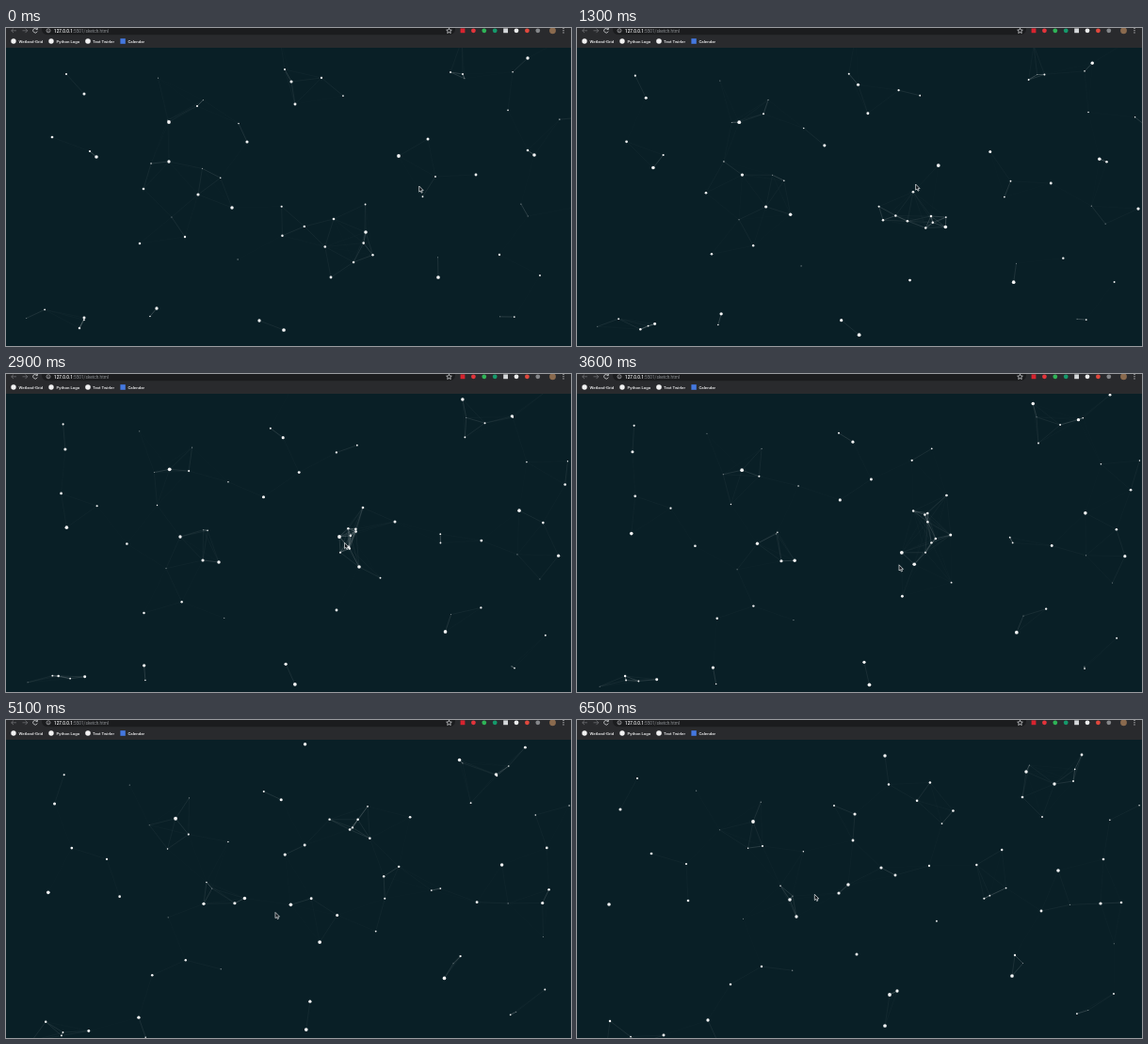
Recreate the animation shown at these times as an HTML page with a canvas. Size 600 by 338 pixels, loop 6600 ms.

```html
<!DOCTYPE html>
<html lang="en">
<head>
<meta charset="utf-8">
<title>Sketch</title>
<style>
  html, body { margin: 0; width: 100%; height: 100%; overflow: hidden; background: #091f26; }
  canvas, svg { position: absolute; left: 0; top: 0; width: 600px; height: 338px; }
  text { font-family: Roboto, Inter, sans-serif; }
  .mark { font-size: 4.4px; font-weight: 500; fill: #f1f1f2; }
  .url { font-size: 4.7px; fill: #8d9094; }
  .url tspan { font-weight: 500; fill: #f1f1f2; }
  .nav { fill: none; stroke: #d0d1d3; stroke-width: .8; }
</style>
</head>
<body>
<canvas id="sky"></canvas>
<svg viewBox="0 0 600 338">
  <rect width="600" height="21" fill="#292a2d"/>
  <rect x="38" y="-6" width="439" height="13.2" rx="6" fill="#1b1c1e"/>
  <path class="nav" stroke-opacity=".4" d="M11 2.8H5.8M8 .5L5.7 2.8L8 5.1"/>
  <path class="nav" stroke-opacity=".4" d="M17.5 2.8h5.2M20.5 .5l2.3 2.3l-2.3 2.3"/>
  <path class="nav" d="M33 1.2A2.4 2.4 0 1 0 33.3 3.6M33.4 -.2V1.6H31.5"/>
  <g class="nav"><circle cx="45" cy="2.8" r="2" stroke-width=".6"/><path d="M45 2.4v1.5" stroke-width=".6"/></g>
  <text class="url" x="51" y="4.5"><tspan>127.0.0.1</tspan>:5501/sketch.html</text>
  <path class="nav" stroke-width=".6" d="M470.5 .2l.8 1.8 2 .2-1.5 1.3.4 2-1.7-1-1.7 1 .4-2-1.5-1.3 2-.2z"/>
  <g id="tools"></g>
  <g fill="#f1f1f2">
    <circle cx="8" cy="14" r="2.7"/>
    <circle cx="48" cy="14" r="2.7"/>
    <circle cx="87" cy="14" r="2.8"/>
    <rect x="121.4" y="11.2" width="5.4" height="5.6" fill="#4478e0"/>
  </g>
  <text class="mark" x="13.5" y="15.6">Wetland-Grid</text>
  <text class="mark" x="53.5" y="15.6">Python Logo</text>
  <text class="mark" x="92" y="15.6">Text Twirler</text>
  <text class="mark" x="129.5" y="15.6">Calendar</text>
  <path id="mouse" d="M0 0V6.2L1.4 5L2.4 7.2L3.5 6.7L2.6 4.6H4.5Z" fill="#10151a" stroke="#e8ecee" stroke-width=".7"/>
</svg>
<script>
const LOOP = 6600, STEP = 100, END = 6500, MEET = 2900;
const REACH = 55, PULL = 4700;
const HUB = { x: 360, y: 175 };

// Start and end of the main drifting stars, largest first.
const drifters = [
  [173,100, 187,108], [295,321, 327,325], [459,265, 462,272], [96,137, 34,196],
  [561,135, 511,160], [484,13, 477,55], [290,5, 327,38], [554,32, 507,68],
  [160,298, 139,319], [269,311, 340,288], [602,191, 556,195], [256,121, 323,157],
  [303,57, 295,100], [83,70, 46,95], [83,308, 92,335], [307,81, 338,165],
  [499,156, 493,203], [595,10, 536,37], [49,116, 79,142], [613,95, 559,148],
  [146,171, 118,192], [554,130, 578,194], [142,229, 163,281], [78,319, 35,320],
  [190,222, 196,262], [524,241, 465,250], [335,53, 374,155], [89,131, 116,153],
  [64,49, 64,62], [203,83, 197,134], [296,44, 273,91], [485,49, 527,65],
  [567,263, 570,291], [472,47, 494,103]
];

// Stars caught by the pointer: start, meeting point, end.
const caught = [
  [417,136, 354,173, 332,292], [382,217, 375,205, 226,191],
  [240,191, 226,200, 288,175], [173,142, 185,173, 233,209],
  [204,177, 209,198, 278,184], [448,118, 413,157, 297,249],
  [345,265, 351,251, 293,128], [348,203, 379,142, 473,82]
];

let seed = 7;
function random(min, max) {
  seed = (seed * 16807) % 2147483647;
  return min + (max - min) * seed / 2147483647;
}
const times = (n, make) => Array.from({ length: n }, (_, i) => make(i));

// A straight drift that the pull of the hub bends outward between its ends.
function drift([x0, y0, x1, y1]) {
  return t => {
    const u = t / END, x = x0 + (x1 - x0) * u, y = y0 + (y1 - y0) * u;
    const dx = x - HUB.x, dy = y - HUB.y, d = Math.max(40, Math.hypot(dx, dy));
    const bow = PULL * u * (1 - u) / (d * d);
    return { x: x + dx * bow, y: y + dy * bow };
  };
}

// A parabola through three points.
function swing([x0, y0, x1, y1, x2, y2]) {
  return t => {
    const a = (t - MEET) * (t - END) / (MEET * END);
    const b = t * (t - END) / (MEET * (MEET - END));
    const c = 1 - a - b;
    return { x: a * x0 + b * x1 + c * x2, y: a * y0 + b * y1 + c * y2 };
  };
}

// Gathers round the hub, then crosses to the far side.
function crossing() {
  const turn = random(0, 2 * Math.PI), near = random(8, 24), far = random(60, 120);
  return t => {
    const along = far * (t - MEET) / (END - MEET);
    return {
      x: HUB.x - 5 + along * Math.cos(turn) - near * Math.sin(turn),
      y: HUB.y - 8 + along * Math.sin(turn) + near * Math.cos(turn)
    };
  };
}

function faint() {
  const x = random(20, 590), y = random(30, 335);
  return drift([x, y, x + random(-35, 35), y + random(-15, 45)]);
}

const stars = [
  ...drifters.map((p, i) => ({ at: drift(p), r: 1.9 - i / drifters.length })),
  ...caught.map((p, i) => ({ at: swing(p), r: 1.9 - .08 * i })),
  ...times(7, () => ({ at: crossing(), r: random(1, 1.4) })),
  ...times(26, () => ({ at: faint(), r: random(.5, .95) }))
];

// Pointer stops: time, x, y.
const stops = [
  [0, 438.7, 168], [1300, 359.6, 166], [2000, 359.6, 166],
  [2900, 359.5, 179.3], [4300, 324.5, 226.3], [5800, 252.3, 185.3]
];

function pointerAt(t) {
  const i = Math.max(1, stops.findIndex(s => s[0] > t));
  if (t >= stops.at(-1)[0]) return stops.at(-1).slice(1);
  const [t0, x0, y0] = stops[i - 1], [t1, x1, y1] = stops[i];
  const u = (t - t0) / (t1 - t0);
  return [x0 + (x1 - x0) * u, y0 + (y1 - y0) * u];
}

const sky = document.getElementById('sky'), ctx = sky.getContext('2d');
const mouse = document.getElementById('mouse');
const scale = window.devicePixelRatio || 1;
sky.width = 600 * scale;
sky.height = 338 * scale;

function draw(t) {
  ctx.setTransform(scale, 0, 0, scale, 0, 0);
  ctx.fillStyle = '#091f26';
  ctx.fillRect(0, 0, 600, 338);
  const dots = stars.map(s => ({ r: s.r, ...s.at(t) }));

  ctx.lineWidth = .6;
  dots.forEach((a, i) => {
    for (const b of dots.slice(i + 1)) {
      const d = Math.hypot(a.x - b.x, a.y - b.y);
      if (d >= REACH) continue;
      ctx.strokeStyle = `rgba(255,255,255,${.6 * Math.exp(-d / 15)})`;
      ctx.beginPath();
      ctx.moveTo(a.x, a.y);
      ctx.lineTo(b.x, b.y);
      ctx.stroke();
    }
  });

  for (const { x, y, r } of dots) {
    ctx.fillStyle = `rgba(255,255,255,${r < .7 ? .5 : .95})`;
    ctx.beginPath();
    ctx.arc(x, y, r, 0, 2 * Math.PI);
    ctx.fill();
  }
  mouse.setAttribute('transform', `translate(${pointerAt(t).join(' ')})`);
}

const tools = document.getElementById('tools');
function dot(x, y, r, fill, square) {
  const el = document.createElementNS('http://www.w3.org/2000/svg', square ? 'rect' : 'circle');
  const shape = square ? { x: x - r, y: y - r, width: 2 * r, height: 2 * r } : { cx: x, cy: y, r };
  for (const [k, v] of Object.entries({ ...shape, fill })) el.setAttribute(k, v);
  tools.append(el);
}
['#d8232f', '#e3343b', '#2fb457', '#159a6b', '#d5d8da', '#eceded', '#e2483d', '#85878a']
  .forEach((fill, i) => dot(485 + i * 11.4, 2.8, 2.4, fill, i === 0 || i === 4));
dot(580.5, 2.8, 3.4, '#8a6a4e');
[.5, 2.7, 4.9].forEach(y => dot(592, y, .6, '#d0d1d3'));

const start = performance.now();
function tick() {
  const now = Math.max(0, performance.now() - start) % LOOP;
  draw(Math.floor(now / STEP) * STEP);
  requestAnimationFrame(tick);
}
tick();
</script>
</body>
</html>
```
